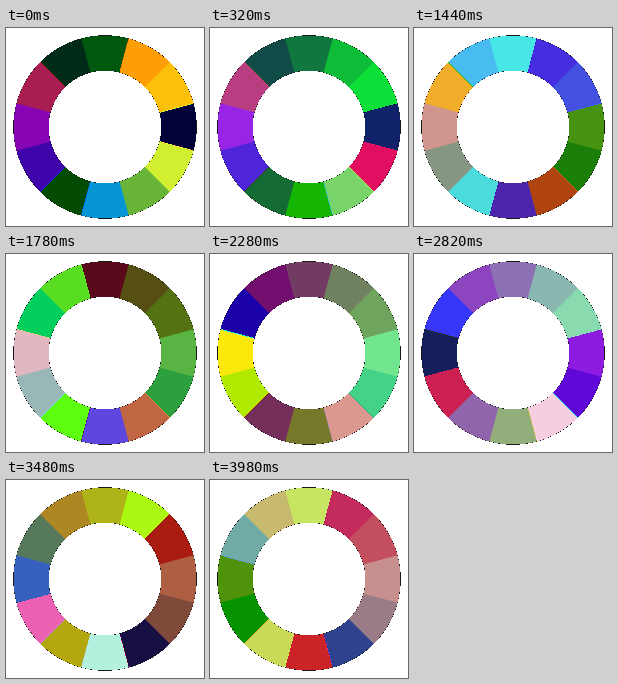
Animation of 198 by 198 pixels, one loop 4 s. Source, as an HTML page with a canvas:

```html
<!DOCTYPE html>
<html lang="en">
<head>
<meta charset="utf-8">
<title>Colour wheel</title>
<style>
  html, body { margin: 0; width: 100%; height: 100%; overflow: hidden; background: #fff; }
  canvas { display: block; width: 198px; height: 198px; }
</style>
</head>
<body>
<canvas id="wheel" width="198" height="198"></canvas>
<script>
const SIZE = 198, CENTER = 99, OUTER = 91.5, INNER = 56.5;
const STEP_MS = 20, STEPS = 200;

// Clockwise from the top
const COLORS = [
  'fe5308', 'fb9902', 'fabc02', 'fefe33', 'd0ea2b', '66b032',
  '0391ce', '0247fe', '3d01a5', '8601af', 'a7194b', 'fe2712'
].map(hex => [0, 2, 4].map(i => parseInt(hex.slice(i, i + 2), 16)));

const ctx = document.getElementById('wheel').getContext('2d');
const image = ctx.createImageData(SIZE, SIZE);
const pixels = image.data.fill(255);
const ring = [];

const clamp = v => Math.max(0, Math.min(1, v));

// Base colour at a point, with a one-pixel blend across each seam
function colorAt(dx, dy, r) {
  const pos = (Math.atan2(dx, -dy) / (2 * Math.PI) + 1) * 12;
  const seam = Math.floor(pos) + 0.5;
  const mix = clamp(0.5 + r * Math.sin((pos - seam) * Math.PI / 6));
  const before = COLORS[(seam - 0.5) % 12], after = COLORS[(seam + 0.5) % 12];
  return before.map((c, i) => Math.round(c + (after[i] - c) * mix));
}

// The thin broken rim stays dark; the ring inside it cycles
for (let y = 0; y < SIZE; y++) {
  for (let x = 0; x < SIZE; x++) {
    const dx = x + 0.5 - CENTER, dy = y + 0.5 - CENTER;
    const r = Math.hypot(dx, dy);
    const cover = clamp(OUTER - r + 0.5) * clamp(r - INNER + 0.5);
    const at = (y * SIZE + x) * 4;
    if (cover >= 0.5) ring.push({ at, rgb: colorAt(dx, dy, r) });
    else if (cover > 0.2) pixels.fill(24, at, at + 3);
  }
}

// Channels climb at rates 1, 2 and 3, wrapping past 255
function draw(step) {
  const shift = step + 2;
  for (const { at, rgb } of ring) {
    for (let c = 0; c < 3; c++) pixels[at + c] = (rgb[c] + shift * (c + 1)) & 255;
  }
  ctx.putImageData(image, 0, 0);
}

const start = performance.now();
let shown = -1;

function tick() {
  const step = Math.floor((performance.now() - start) / STEP_MS + 0.001) % STEPS;
  if (step !== shown) draw(shown = step);
  requestAnimationFrame(tick);
}
tick();
</script>
</body>
</html>
```
